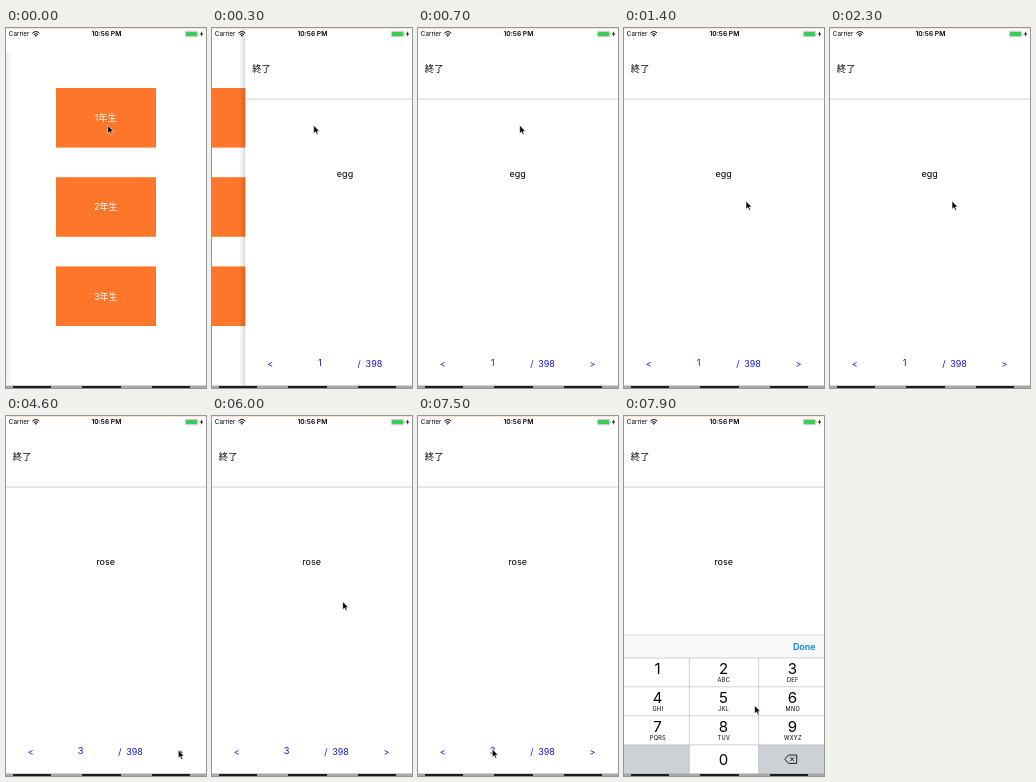
Write an HTML page that moves like this. It is 200 by 360 pixels and loops after 8000 ms.

```html
<!DOCTYPE html>
<html lang="ja">
<head>
<meta charset="utf-8">
<title>Word cards</title>
<style>
html, body { margin: 0; height: 100%; overflow: hidden; background: #fff; }
svg { display: block; width: 200px; height: 360px; font: 9px Inter, "Noto Sans CJK JP", "Noto Sans CJK", sans-serif; }
.mid { text-anchor: middle; }
.blue { fill: #1a1ac8; }
.num { font-size: 15px; }
.abc { font-size: 5.6px; letter-spacing: .3px; }
</style>
</head>
<body>
<svg viewBox="0 0 200 360">
  <defs>
    <linearGradient id="edge"><stop stop-color="#ececec"/><stop offset="1" stop-color="#fff"/></linearGradient>
    <linearGradient id="shade"><stop stop-color="#000" stop-opacity="0"/><stop offset="1" stop-color="#000" stop-opacity=".15"/></linearGradient>
  </defs>
  <rect width="200" height="360" fill="#fff"/>

  <g id="menu">
    <rect y="25" width="6" height="330" fill="url(#edge)"/>
  </g>

  <g id="card">
    <rect x="-6" width="6" height="360" fill="url(#shade)"/>
    <rect width="200" height="360" fill="#fff"/>
    <text x="6.8" y="44.2" font-size="9.4">終了</text>
    <rect y="70.7" width="200" height=".7" fill="#bcbcbc"/>
    <text id="word" class="mid" x="99.6" y="149.2" font-size="9"></text>
    <g class="mid blue">
      <text x="24.8" y="338.7">&lt;</text>
      <text id="page" x="74.6" y="338.2" font-size="9.3"></text>
      <text x="113.8" y="338.7">/</text>
      <text x="128.5" y="338.7">398</text>
      <text x="174.6" y="338.7">&gt;</text>
    </g>
  </g>

  <g id="pad">
    <rect y="219" width="200" height="141" fill="#fff"/>
    <rect y="219" width="200" height="23" fill="#f8f8f8"/>
    <rect y="218.7" width="200" height=".6" fill="#c4c4c4"/>
    <text x="168.9" y="233.7" font-size="8.9" font-weight="600" fill="#0a84e4">Done</text>
    <path d="M0 329H65.3V360H0ZM134.6 329H200V360H134.6Z" fill="#ccd1d5"/>
    <path d="M0 242H200M0 270.8H200M0 299.8H200M0 328.8H200M65.3 242V358M134.6 242V358" stroke="#b4b6ba" stroke-width=".6"/>
    <path d="M160.8 343.2L164.5 339H172.7V347.4H164.5ZM166.3 341.3L170 345.1M170 341.3L166.3 345.1" fill="none" stroke="#111" stroke-width=".9" stroke-linejoin="round"/>
  </g>

  <g id="status">
    <rect width="200" height="1" fill="#fbe0d4"/>
    <text x="2.8" y="8.4" font-size="6.3">Carrier</text>
    <path d="M26.3 5.2Q29.8 1.9 33.3 5.2M27.6 6.6Q29.8 4.6 32 6.6" fill="none" stroke="#000"/>
    <path d="M29.8 8.8L28.6 7.6Q29.8 6.6 31 7.6Z"/>
    <text class="mid" x="100.4" y="8.4" font-size="6.7" font-weight="600">10:56 PM</text>
    <rect x="179.3" y="3.3" width="12.4" height="5.4" rx="1" fill="#fff" stroke="#888" stroke-width=".5"/>
    <rect x="180" y="4" width="11" height="4" rx=".5" fill="#3ecb55"/>
    <path d="M192.3 5v2q1 -1 0 -2" fill="#777"/>
    <path d="M196.2 3L194 6.4H195.5L194.9 9L197.2 5.5H195.7Z"/>
    <rect y="357.5" width="200" height="2.5" fill="#a8a8a8"/>
    <path d="M7 358h38v2h-38zM76 358h39v2h-39zM146 358h38v2h-38z" fill="#1c1c1c"/>
  </g>

  <path id="cursor" d="M0 0V8.2L1.9 6.5L3.1 9.3L4.5 8.7L3.3 6H5.8Z" stroke="#fff" stroke-width=".6"/>
</svg>
<script>
const $ = id => document.getElementById(id);
const span = (t, a, b) => Math.min(1, Math.max(0, (t - a) / (b - a)));
const easeOut = (u, n) => 1 - (1 - u) ** n;
const smooth = u => u * u * (3 - 2 * u);
const shift = (id, x, y = 0) => $(id).setAttribute('transform', `translate(${x} ${y})`);
const add = (id, markup) => $(id).insertAdjacentHTML('beforeend', markup);

for (let i = 0; i < 3; i++) {
  const y = 60 + i * 89.2;
  add('menu', `<rect x="50" y="${y}" width="100" height="59.6" fill="#fd762a"/>
    <text class="mid" x="99.7" y="${y + 33.2}" fill="#fff">${i + 1}年生</text>`);
}

['', 'ABC', 'DEF', 'GHI', 'JKL', 'MNO', 'PQRS', 'TUV', 'WXYZ'].forEach((abc, i) => {
  const x = [33.6, 99.5, 168.5][i % 3], y = 257.9 + Math.floor(i / 3) * 28.9;
  add('pad', `<text class="mid num" x="${x}" y="${y}">${i + 1}</text>
    <text class="mid abc" x="${x + .3}" y="${y + 8.3}">${abc}</text>`);
});
add('pad', '<text class="mid num" x="99.6" y="349">0</text>');

// Pointer stops: time, x, y
const stops = [
  [0, 101.7, 97.3], [900, 101.7, 97.3], [1400, 122, 173],
  [2700, 122, 173], [3500, 172.3, 334], [4800, 172.3, 334],
  [5300, 130.7, 185.5], [6000, 130.7, 185.5], [6800, 75.5, 328],
  [7500, 74.3, 333], [7600, 74.3, 333], [7900, 130.7, 289.4], [8000, 130.7, 289.4]
];

function pointer(t) {
  const i = stops.findIndex(s => s[0] > t);
  const [a, x, y] = stops[i - 1], [b, x2, y2] = stops[i];
  const u = smooth(span(t, a, b));
  return [x + (x2 - x) * u, y + (y2 - y) * u];
}

function draw(t) {
  const push = easeOut(span(t, 50, 600), 3);
  const turned = t >= 3800;
  shift('menu', -60 * push);
  shift('card', 206 * (1 - push));
  shift('pad', 0, 142 * (1 - easeOut(span(t, 7600, 7900), 2)));
  shift('cursor', ...pointer(t));
  $('word').textContent = turned ? 'rose' : 'egg';
  $('page').textContent = turned ? 3 : 1;
}

const start = performance.now();
function tick() {
  const t = (performance.now() - start) % 8000;
  draw(Math.floor(t / 100) * 100); // ten pictures a second
  requestAnimationFrame(tick);
}
tick();
</script>
</body>
</html>
```
